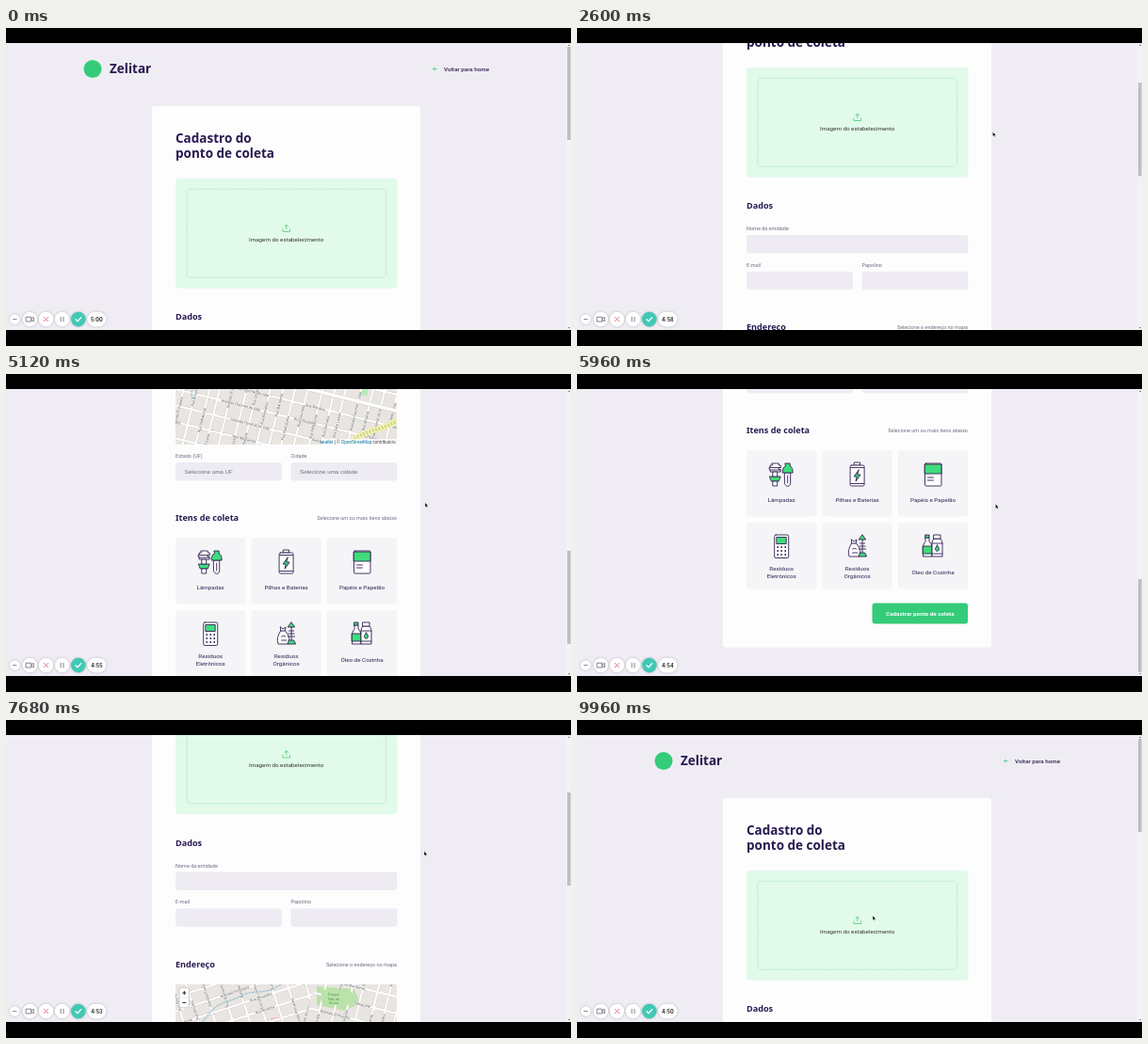
These frames come from a looping animation (600x338 px, 10 s). An HTML page:

```html
<!DOCTYPE html>
<html lang="pt">
<head>
<meta charset="utf-8">
<title>Cadastro do ponto de coleta</title>
<style>
  html, body { margin: 0; height: 100%; overflow: hidden; background: #000; }
  svg.stage { display: block; width: 100vw; height: 100vh; }
  text { font: 6.25px Roboto, sans-serif; fill: #322153; }
  .title { font: 700 13.5px "Noto Sans", sans-serif; fill: #281a50; }
  .section { font: 700 9.1px "Noto Sans", sans-serif; fill: #281a50; }
  .label { font-size: 5.5px; fill: #6c6c80; }
  .select { font: 6.25px "Liberation Sans", sans-serif; fill: #6c6c80; }
  .mid { text-anchor: middle; }
  .end { text-anchor: end; }
  .field { fill: #eeecf2; }
  .street { font: 3.7px "Noto Sans", sans-serif; fill: #444; stroke: #fff; stroke-width: .7; paint-order: stroke; }
  .icon { fill: #fff; stroke: #322153; stroke-width: .9; stroke-linejoin: round; stroke-linecap: round; }
  .icon .g { fill: #3fdc7c; }
  .icon .n { fill: none; }
  .tool { fill: #fff; filter: drop-shadow(0 .5px 1px #0004); }
  .glyph { fill: none; stroke: #77757d; stroke-width: .9; stroke-linecap: round; stroke-linejoin: round; }
</style>
</head>
<body>
<svg class="stage" viewBox="0 0 600 338">
  <defs>
    <clipPath id="mapBox"><rect width="235" height="136.5" rx="1"/></clipPath>
    <clipPath id="north"><path d="M0 0H150L122 72 27 49 0 58Z"/></clipPath>
    <clipPath id="south"><path d="M150 0H235V137H0V58L27 49 122 72Z"/></clipPath>
  </defs>
  <rect width="600" height="338" fill="#efedf3"/>

  <g id="page">
    <circle cx="92" cy="43.5" r="9.5" fill="#34cb79"/>
    <text class="title" x="110" y="48.3">Zelitar</text>
    <path d="M458 43.5H453.5M455.5 41.5L453.5 43.5 455.5 45.5" fill="none" stroke="#34cb79" stroke-width=".7"/>
    <text x="465" y="45.7" font-weight="500" style="font-weight:500">Voltar para home</text>

    <rect x="155" y="83" width="285" height="819.5" rx="3" fill="#fefdfe"/>
    <text class="title" x="180" y="121.5">Cadastro do</text>
    <text class="title" x="180" y="137.5">ponto de coleta</text>

    <rect x="180" y="159.7" width="235.5" height="117" rx="4" fill="#e1faea"/>
    <rect x="192" y="171.3" width="211.7" height="94" rx="4" fill="none" stroke="#8fd9ae" stroke-width=".6" stroke-dasharray="1.2 .8"/>
    <path d="M294 213.5V216.5H301.5V213.5M297.7 214V209.3M295.5 211.3L297.7 209.1 300 211.3" fill="none" stroke="#4ecb79" stroke-width=".8"/>
    <text class="mid" x="297.7" y="226.8" style="fill:#333">Imagem do estabelecimento</text>

    <text class="section" x="180" y="310">Dados</text>
    <g id="fields"></g>

    <text class="section" x="180" y="439.3">Endereço</text>
    <text class="label end" x="415" y="438.2">Selecione o endereço no mapa</text>
    <g transform="translate(180 457.5)" clip-path="url(#mapBox)">
      <rect width="235" height="137" fill="#e9e5e1"/>
      <path d="M150 2L190 5 196 20 180 28 150 22Z" fill="#b9e3a8"/>
      <path d="M195 76h9v8h-9zM95 53h8v5h-8z" fill="#b9e8b4"/>
      <path d="M101 36l7 -1 1 6 -7 1z" fill="#f5b9c4"/>
      <g id="streets"></g>
      <path d="M155 5L187 8 190 20 178 24 155 19Z" fill="#b9e3a8"/>
      <path d="M112 0C97 12 82 5 70 12S45 18 35 32S20 45 22 60S14 75 18 88" fill="none" stroke="#a9cbd4" stroke-width="1.5" stroke-dasharray="3 .7"/>
      <path d="M180 140C200 118 215 124 236 111" fill="none" stroke="#eef0a6" stroke-width="6"/>
      <path d="M180 140C200 118 215 124 236 111" fill="none" stroke="#b8b98a" stroke-width="3" stroke-dasharray="1 2.5"/>
      <g class="mid" style="text-anchor:middle">
        <text x="168" y="12" style="font-size:3.8px;fill:#4f9a58">Parque</text>
        <text x="168" y="16.5" style="font-size:3.8px;fill:#4f9a58">Vale do</text>
        <text x="168" y="21" style="font-size:3.8px;fill:#4f9a58">Brisal</text>
      </g>
      <circle cx="31.5" cy="49.3" r="2.4" fill="#fff" stroke="#c8202c" stroke-width="1.3"/>
      <path d="M30.3 49.3h2.4" stroke="#c8202c" stroke-width="1"/>
      <rect x="4" y="3.7" width="10.4" height="21" rx="1.2" fill="#fff" stroke="#bbb" stroke-width=".7"/>
      <path d="M4 14.2H14.4" stroke="#ccc" stroke-width=".4"/>
      <path d="M7.3 9h4M9.3 7v4M7.3 19.4h4" stroke="#111" stroke-width=".9"/>
      <rect x="156.5" y="130.5" width="79" height="6" fill="#fffc"/>
      <text class="end" x="233.5" y="135.2" style="font:4.6px 'Liberation Sans',sans-serif;fill:#444"><tspan fill="#0078a8">Leaflet</tspan> | © <tspan fill="#0078a8">OpenStreetMap</tspan> contributors</text>
    </g>

    <text class="section" x="180" y="675.3">Itens de coleta</text>
    <text class="label end" x="415" y="674">Selecione um ou mais ítens abaixo</text>
    <g id="items"></g>
    <rect x="313.5" y="855.6" width="101.6" height="22" rx="3" fill="#34cb79"/>
    <text class="mid" x="364.3" y="868.8" style="fill:#fff;font-weight:700">Cadastrar ponto de coleta</text>
  </g>

  <rect x="595" y="16" width="5" height="305" fill="#f3f2f5"/>
  <path d="M596.7 19L598 17.5 599.3 19ZM596.7 318L598 319.5 599.3 318Z" fill="#777"/>
  <rect id="thumb" x="596" y="20" width="3.6" height="99" fill="#bfbdc2"/>

  <g>
    <circle class="tool" cx="9.3" cy="309.6" r="5.3"/>
    <circle class="tool" cx="25.4" cy="309.6" r="7.8"/>
    <circle class="tool" cx="42.5" cy="309.6" r="7.8"/>
    <circle class="tool" cx="59.6" cy="309.6" r="7.8"/>
    <circle class="tool" cx="76.8" cy="309.6" r="7.8" style="fill:#41c9b5"/>
    <rect class="tool" x="86.3" y="301.8" width="20.2" height="15.6" rx="7.8"/>
    <path class="glyph" d="M7.5 309.6h3.6M21.5 307.2h5.3v4.8h-5.3zM26.8 309l2.6 -1.6v4.4l-2.6 -1.6M58.2 307.3v4.6M61 307.3v4.6"/>
    <path class="glyph" d="M40.3 307.4l4.4 4.4M44.7 307.4l-4.4 4.4" style="stroke:#e0697c"/>
    <path class="glyph" d="M74 309.8l2 2 3.7 -4.2" style="stroke:#fff;stroke-width:1.3"/>
    <text id="clock" class="mid" x="96.4" y="311.7" style="font:700 5.5px Inter,sans-serif;fill:#333"></text>
  </g>

  <path id="cursor" d="M0 0V4.6L1.1 3.7 1.9 5.3 2.7 4.9 2 3.4H3.4Z" fill="#000" stroke="#fff" stroke-width=".35"/>
  <path d="M0 0H600V16H0ZM0 321H600V338H0Z"/>
</svg>

<script>
const $ = id => document.getElementById(id);
const text = (cls, x, y, str, extra = '') => `<text class="${cls}" x="${x}" y="${y}" ${extra}>${str}</text>`;

// Form fields: label, x, y of the box, width, placeholder
$('fields').innerHTML = [
  ['Nome da entidade', 180, 338, 235.3, ''],
  ['E-mail', 180, 376.7, 113, ''],
  ['Papolino', 302.5, 376.7, 112.8, ''],
  ['Estado (UF)', 180, 613, 113, 'Selecione uma UF'],
  ['Cidade', 302.5, 613, 112.8, 'Selecione uma cidade'],
].map(([label, x, y, w, hint]) =>
  text('label', x, y - 4.8, label) +
  `<rect class="field" x="${x}" y="${y}" width="${w}" height="19.5" rx="3"/>` +
  text('select', x + 9.5, y + 11.9, hint)).join('');

// Icons are drawn around their own centre
const icons = {
  bulbs: `<path d="M-10 -12h7v2h2v2.5h-2v2h2v2.5h-11v-2.5h-1v-2.5h1v-2h2z"/><path class="n" d="M-12 -7.5h11M-12 -5h11"/>
    <path class="g" d="M-12.5 2h11.500l-2 5h-7.500z"/><path d="M-9 -3h4.500v5h-4.500zM-9 7h4.500v5h-4.500z"/>
    <path d="M3.500 -2h6v12q-3 5 -6 0z"/><path class="g" d="M4 -12h5v3q3 1 3 7h-11q0 -6 3 -7z"/><path class="n" d="M6.500 1v8"/>`,
  battery: `<path d="M-3 -13h6v3h-6z"/><rect x="-7.500" y="-10" width="15" height="22" rx="1.500"/>
    <path class="n" d="M-7 -7.500h14M-7 9.500h14"/><path class="g" d="M1.500 -5l-5 7h3l-1 5 5 -7h-3z"/>`,
  paper: `<rect x="-8.500" y="-12" width="17.500" height="24" rx="1.200"/><path class="g" d="M-8.500 -11h17.500v10h-17.500z"/>
    <path class="n" d="M-5.500 3h6M-5.500 6h6"/>`,
  calculator: `<rect x="-7.500" y="-12" width="15" height="24.500" rx="1.500"/><path class="g" d="M-5 -9.500h10v7h-10z"/>
    <path class="n" stroke-width="1.800" d="M-4 1h0M0 1h0M4 1h0M-4 5h0M0 5h0M4 5h0M-4 9h0M0 9h0M4 9h0"/>`,
  organic: `<path d="M-6 -3q-5 8 -2.500 14h11q3 -6 -3.500 -14z"/><path d="M-6 -7l2.500 2 3 -2 -1 4h-4z"/><path class="n" d="M-5 3q2 -2 4 0M-5 7h5"/>
    <path class="g" d="M5.500 -12l3.500 5h-7z"/><path class="n" d="M5.500 -7v16M3 -3h5M2.500 0h6M2 3h7"/><path class="g" d="M3 7h5l2 4h-8z"/>`,
  oil: `<path d="M-8 -9h4v4q3 3 3 6v10h-9.500v-10q0 -3 2.500 -6z"/><path class="g" d="M-8 -12h4v3h-4zM-10.500 0h9.500v8h-9.500z"/>
    <path d="M1 -8h7q2 2 2 5v14h-11v-14q0 -3 2 -5z"/><path d="M1 -12h7v4h-7z"/><path class="n" d="M-1 -3h11M-1 8h11"/><path class="g" d="M4.500 -1q4 5 0 6.500 -4 -1.500 0 -6.500z"/>`,
};
$('items').innerHTML = [
  ['bulbs', 'Lâmpadas'], ['battery', 'Pilhas e Baterias'], ['paper', 'Papéis e Papelão'],
  ['calculator', 'Resíduos', 'Eletrônicos'], ['organic', 'Resíduos', 'Orgânicos'], ['oil', 'Óleo de Cozinha'],
].map(([icon, ...lines], i) => {
  const row = i / 3 | 0, x = 180 + i % 3 * 80.4, y = 693 + row * 77, cx = x + 37.2;
  const base = row ? y + 55.3 - (lines.length - 1) * 4 : y + 55.3;
  return `<rect x="${x}" y="${y}" width="74.5" height="70.5" rx="3" fill="#f5f4f6"/>` +
    `<g class="icon" transform="translate(${cx} ${y + 26 - row})">${icons[icon]}</g>` +
    lines.map((line, k) => text('mid', cx, base + k * 7.8, line)).join('');
}).join('');

// Map: tilted street grids with names along the streets
const names = ['Rua Brisalva', 'Rua Tarumela', 'Rua Olivandra', 'Rua Pedralume', 'Avenida Florimel do Vale',
  'Rua Cantoluz', 'Rua Marivento', 'Rua Sete Lumes', 'Avenida Primavela', 'Rua Dorivalta'];
let seed = 7;
const random = () => (seed = seed * 16807 % 2147483647) / 2147483647;
const streetName = () => names[random() * names.length | 0];

function grid(clip, angle, rowGap, colGap) {
  let roads = '', labels = '';
  for (let i = -9; i <= 9; i++) {
    const y = i * rowGap;
    roads += `M-260 ${y}H260`;
    for (let x = -60 + random() * 30; x < 240; x += 70 + random() * 30)
      labels += text('street', x, y + 1.3, streetName());
  }
  for (let i = -6; i <= 20; i++) {
    const x = i * colGap + random() * 3, top = -160 + random() * 20;
    roads += `M${x} ${top}V200`;
    for (let y = top; y < 160; y += 52 + random() * 25)
      labels += text('street', 0, 1.3, streetName(), `transform="translate(${x} ${y}) rotate(-90)"`);
  }
  return `<g clip-path="url(#${clip})"><g transform="translate(27 49) rotate(${angle})">
    <path d="${roads}" fill="none" stroke="#cbc7c4" stroke-width="2.9"/>
    <path d="${roads}" fill="none" stroke="#fff" stroke-width="2.2"/>${labels}</g></g>`;
}
$('streets').innerHTML = grid('north', -18, 14, 17) + grid('south', 14, 17, 13) +
  `<g transform="translate(27 49) rotate(14)"><path d="M0 0H240" stroke="#cbc7c4" stroke-width="4.2"/>
   <path d="M0 0H240" stroke="#fff" stroke-width="3.4"/>${text('street', 42, 1.3, 'Avenida Serralume Grande')}</g>`;

// Keyframes: time, then values
const scrollKeys = [[0, 0], [1060, 0], [1700, 42], [2600, 118], [2980, 170], [3500, 170], [3560, 182], [3720, 182],
  [4120, 296.5], [5120, 519], [5600, 612], [6060, 612], [6640, 461.5], [7680, 176.5], [8250, 28], [8500, 0], [10000, 0]];
const cursorKeys = [[0, 60, 312], [160, 62, 310], [900, 440, 116], [2600, 441.5, 110.5], [3560, 441.5, 110.5],
  [4120, 447.5, 131.5], [5120, 445, 136.8], [6640, 444, 139.5], [9600, 444, 139.5], [9960, 314, 208], [10000, 314, 208]];

function at(keys, t) {
  const i = keys.findIndex(key => key[0] > t), a = keys[i - 1], b = keys[i];
  const p = (t - a[0]) / (b[0] - a[0]);
  return a.slice(1).map((v, k) => v + (b[k + 1] - v) * p);
}

function draw(now) {
  const t = Math.floor(now % 10000 / 40) * 40;
  const [scroll] = at(scrollKeys, t), [x, y] = at(cursorKeys, t);
  const left = Math.ceil(300 - (t + 40) / 1000);
  $('page').setAttribute('transform', `translate(0 ${-scroll})`);
  $('thumb').setAttribute('y', 20 + scroll * .3233);
  $('cursor').setAttribute('transform', `translate(${x} ${y})`);
  $('cursor').style.display = t ? '' : 'none';
  $('clock').textContent = `${left / 60 | 0}:${String(left % 60).padStart(2, '0')}`;
  requestAnimationFrame(draw);
}
draw(performance.now());
</script>
</body>
</html>
```
